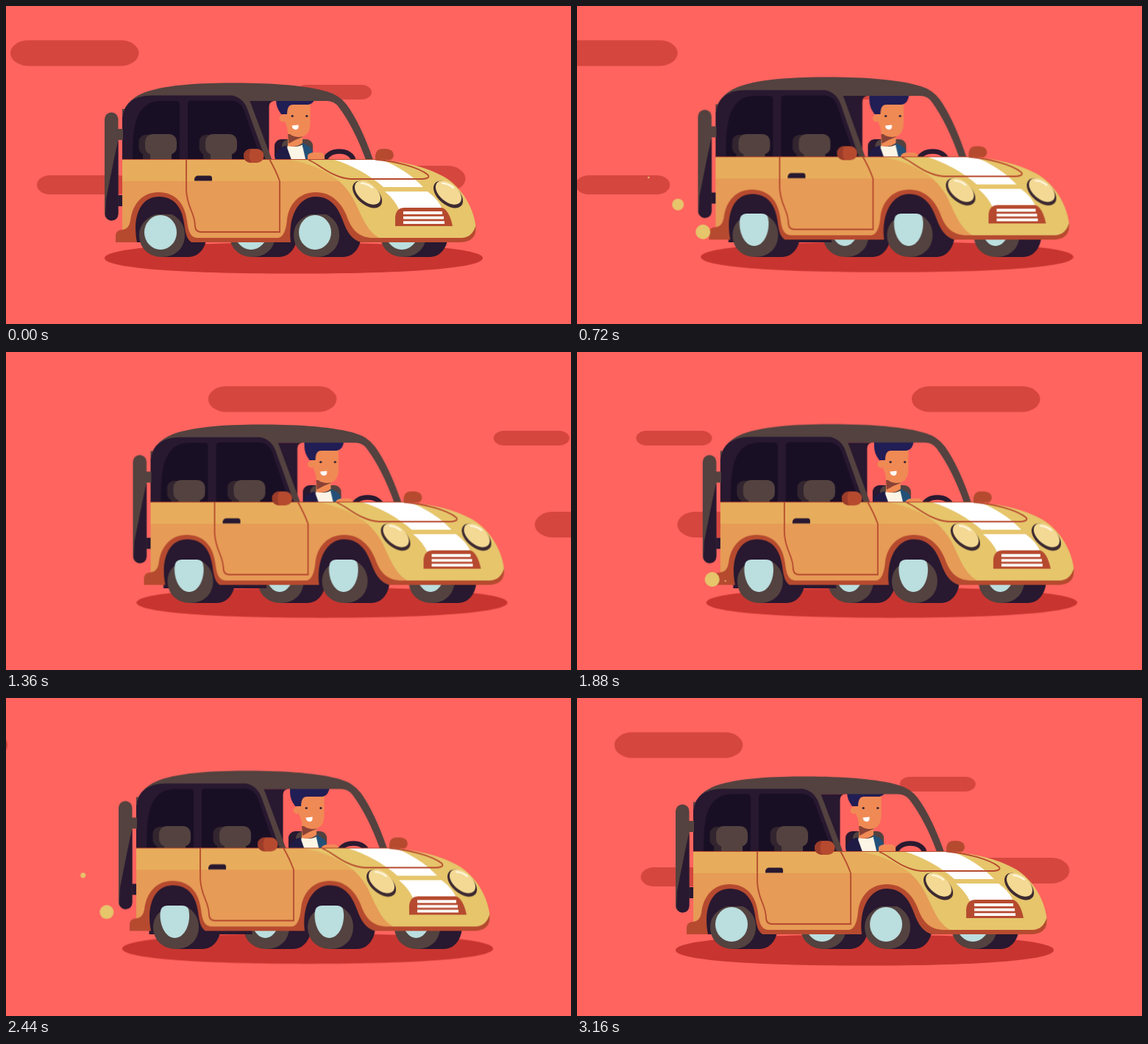
Recreate the animation shown at these times as an HTML page. Size 768 by 432 pixels, loop 3.2 s.

```html
<!DOCTYPE html>
<html lang="en">
<head>
<meta charset="utf-8">
<title>Car ride</title>
<style>
  html, body { margin: 0; width: 100%; height: 100%; overflow: hidden; background: #ff645f; }
  svg { display: block; width: 100vw; height: 100vh; }

  .cloud { fill: #d5463f; }
  .grey { fill: #53423f; }
  .dark { fill: #281830; }
  .glass { fill: #190f25; }
  .rust { fill: #b64a2f; }
  .skin { fill: #f08a55; }
  .sun { fill: #e6c56b; }
  .ice { fill: #bbdedf; }
  .white { fill: #fff; }
  .line { fill: none; stroke: #b64a2f; stroke-width: 1.8; }
  .thin { stroke-width: 1; }

  /* Stepped parts run at 25 frames per second. */
  .drift { animation: drift 1600ms steps(40) -1044ms infinite; }
  .drift.late { animation-delay: -364ms; }
  .sway { animation: sway 3200ms infinite; }
  .bob, .cabin, .shadow, .round, .flat { animation: bob 400ms step-end -4ms infinite; }
  .cabin { animation-name: cabin; transform-origin: 0 208px; }
  .shadow { animation-name: press; transform-origin: 391px 342px; }
  .round { animation-name: landed; }
  .flat { animation-name: lifted; }
  .puff { animation: puff 1600ms linear 60ms infinite both; }
  .puff.b { animation-delay: 260ms; }
  .puff.c { animation-delay: 460ms; }

  @keyframes drift {
    from { transform: translateX(1164.8px); }
    to { transform: translateX(-627.2px); }
  }
  @keyframes sway {
    0% { transform: translateX(0); animation-timing-function: cubic-bezier(.2, .28, .3, 1); }
    50% { transform: translateX(39px); animation-timing-function: cubic-bezier(.45, 0, .6, 1); }
    100% { transform: translateX(0); }
  }
  @keyframes bob {
    0%, 90%, 100% { transform: translateY(0); }
    10% { transform: translateY(-4.6px); }
    80% { transform: translateY(-3.6px); }
  }
  @keyframes cabin {
    0%, 100% { transform: translateY(0) scaleY(1); }
    10% { transform: translateY(-4.6px) scaleY(1.01); }
    40% { transform: translateY(-4.6px) scaleY(1.014); }
    70% { transform: translateY(-4.6px) scaleY(1.018); }
    80% { transform: translateY(-3.6px) scaleY(1.042); }
    90% { transform: translateY(0) scaleY(.98); }
  }
  @keyframes press {
    0%, 90%, 100% { transform: translateY(0) scale(1); }
    10% { transform: translateY(-2px) scale(.981); }
    80% { transform: translateY(-1.6px) scale(.985); }
  }
  @keyframes landed {
    0%, 90%, 100% { opacity: 1; }
    10% { opacity: 0; }
  }
  @keyframes lifted {
    0%, 90%, 100% { opacity: 0; }
    10% { opacity: 1; }
  }
  @keyframes puff {
    0% { transform: translate(166px, 311px) scale(0); }
    1.25% { transform: translate(165px, 311px) scale(.1); }
    13.75% { transform: translate(147px, 309px) scale(1); }
    16.25% { transform: translate(141px, 307px) scale(1); }
    23.75% { transform: translate(118px, 291px) scale(.95); }
    28.75% { transform: translate(107px, 270px) scale(.8); }
    36.25% { transform: translate(86px, 241px) scale(.35); }
    41.25% { transform: translate(67px, 233px) scale(.12); }
    43.75%, 100% { transform: translate(60px, 231px) scale(0); }
  }
</style>
</head>
<body>
<svg viewBox="0 0 768 432" preserveAspectRatio="none">
  <defs>
    <g id="clouds" class="cloud">
      <rect x="6" y="46.5" width="174.500" height="35" rx="25" ry="17.500"/>
      <rect x="394" y="107" width="103" height="20" rx="14" ry="10"/>
      <rect x="42" y="230" width="128" height="26" rx="18" ry="13"/>
      <rect x="450" y="217" width="174.500" height="35" rx="25" ry="17.500"/>
    </g>
    <path id="tread" class="dark" d="M212 341 H248 C263 341 273 327 273 309 C273 292 263 278 248 278 H212Z"/>
    <path id="face" class="grey" d="M204 283 C189 288 181 298 181 311 C181 329 194 341 212 341 C230 341 243 329 243 311 C243 298 236 288 225 283Z"/>
    <ellipse id="disc" class="ice" cx="210" cy="307.500" rx="22" ry="23.500"/>
    <path id="shield" class="ice" d="M190.500 293 Q191 282 200 282 H221 Q230 282 230 293 C231 311 222 326 210.500 326 C199 326 190 311 190.500 293Z"/>
    <g id="headrest">
      <rect x="180.500" y="175" width="32" height="27" rx="9" fill="#33252f"/>
      <rect x="186" y="198" width="24" height="12" fill="#33252f"/>
      <rect class="grey" x="189" y="174" width="43" height="28" rx="10"/>
      <rect class="grey" x="196" y="198" width="29" height="12"/>
    </g>
    <g id="lamp">
      <ellipse cx="491" cy="256" rx="23.500" ry="13.800" transform="rotate(40 491 256)" fill="#3d2a31"/>
      <g transform="rotate(40 491.500 253.500)">
        <ellipse cx="491.500" cy="253.500" rx="20.500" ry="12.200" fill="#f3d994"/>
        <path d="M477 249 Q484 244 492 244.200" fill="none" stroke="#fff6dc" stroke-width="2.500" stroke-linecap="round"/>
      </g>
    </g>
  </defs>

  <rect width="768" height="432" fill="#ff645f"/>
  <use class="drift" href="#clouds"/>
  <use class="drift late" href="#clouds" x="1"/>

  <g class="sway">
    <path class="shadow" fill="#c83530" d="M134 342.500 C134 329.500 230 321.500 391 321.500 S648 329.500 648 342.500 S552 363.500 391 363.500 S134 355.500 134 342.500Z"/>

    <!-- far wheels and chassis -->
    <use href="#tread" x="123"/>
    <use href="#tread" x="328"/>
    <use href="#face" x="123"/>
    <use href="#face" x="328"/>
    <g class="round"><use href="#disc" x="123"/><use href="#disc" x="328"/></g>
    <g class="flat"><use href="#shield" x="123"/><use href="#shield" x="328"/></g>
    <rect class="dark" x="175.500" y="300" width="140" height="21"/>
    <use href="#tread"/>
    <use href="#tread" x="210"/>

    <!-- driver -->
    <rect class="dark" x="365" y="181" width="34" height="32" rx="9"/>
    <rect class="grey" x="375" y="181" width="42" height="32" rx="9"/>
    <path fill="#fbf5e6" d="M378 212 L383 189 Q396 194 405 187 L412 212Z"/>
    <path fill="#1f1b45" d="M366 212 V203 Q367 193 381 189.500 L389 212Z"/>
    <path fill="#235078" d="M402 186 Q416 190 417 200 V212 H408Z"/>
    <path class="skin" d="M383 168 H403 V186 Q394 193 383 190Z"/>
    <path fill="#8a4236" d="M383 174 H403 V178 Q394 181 384 187Z"/>
    <circle class="skin" cx="376.500" cy="152.500" r="5"/>
    <path class="skin" d="M377 128 H413.500 V160 Q413 178 397 178 Q383 177 382 165 L378 155Z"/>
    <path fill="#211d55" d="M367 117 H421 Q421 132 411 134 H390 Q382 134 382 147 H374 Q367 138 367 128Z"/>
    <circle cx="389.200" cy="149.500" r="1.600" fill="#2b2035"/>
    <circle cx="408.800" cy="149.500" r="1.600" fill="#2b2035"/>
    <path class="white" d="M388.500 162.500 L397.500 161.500 Q398.500 167.800 393.800 168 Q389 167.500 388.500 162.500Z"/>
    <ellipse cx="453" cy="210" rx="19" ry="12.500" fill="none" stroke="#2a1a30" stroke-width="6.500"/>
    <path class="skin" d="M410 212 V203 Q412 199 419 199 H428 Q433 200 433 205 V212Z"/>

    <!-- roof, pillars and side windows -->
    <g class="cabin">
      <path class="grey" d="M158 154 Q159 129 188 117.500 C220 106 270 104.500 312 104.500 C360 104.500 410 108 437 116.500 Q453 121 463 134 Q482 160 499 209 H489 Q473 165 452 137 Q446 129 436 129 H320 V140 H158Z"/>
      <path class="dark" d="M330 129 H364 Q357.500 130 357.500 137 V209 H350Z"/>
      <path class="dark" d="M158 209 V151 Q162 122 198 121.500 H308 Q322 122 329 139 L354 209Z"/>
      <path class="grey" d="M306 121.500 H322 Q330 124 333 133 L361.500 209 H353 L328 140 Q322 124 306 121.500Z"/>
      <path class="glass" d="M172 209 C172 165 176 150 187 138 Q195 129.500 210 129 H231 Q236 129 236 134 V209Z"/>
      <path class="glass" d="M247 209 V133 Q247 128.500 252 128.500 H306 Q318 129 323 141 L347 209Z"/>
    </g>
    <use href="#headrest"/>
    <use href="#headrest" x="82"/>

    <g class="bob">
      <!-- spare wheel -->
      <rect class="grey" x="150" y="167" width="9" height="15"/>
      <rect class="dark" x="150" y="257" width="9" height="15"/>
      <rect class="grey" x="134" y="144.500" width="18.500" height="147" rx="9.250"/>
      <path class="dark" d="M152.500 182 L147 207 L136 262 L135 285 Q138 291.500 143.200 291.500 Q152.500 291 152.500 282Z"/>

      <!-- body -->
      <path fill="#e69b56" d="M158 208 H500 C545 211 580 222 600 235 C624 252 636 278 638.500 300 Q640 318 620 320 H158Z"/>
      <path fill="#e7ad5c" d="M158 208 H400 C430 213 450 225 460 238 H158Z"/>
      <path class="sun" d="M380 208 H500 C545 211 580 222 600 235 C624 252 636 278 638.500 300 Q640 317 620 318 H515 C492 312 485 288 472 262 C458 236 428 215 380 208Z"/>
      <path class="white" d="M445 208.500 H510 C532 217 552 230 567 246 H513 C495 230 470 216 445 208.500Z"/>
      <path class="white" d="M515 252 H573 Q588 263 593 276 H534 Q528 263 515 252Z"/>
      <path class="line" d="M411 209 C425 214 442 233 468 235 H566 Q578 234 573 229 C560 219 530 211 502 208.500"/>
      <path class="line thin" d="M158 208.500 H505"/>

      <!-- sill, bumper and arches -->
      <path class="rust" d="M149 321 V311 Q150 304 158 304 Q167 303 169 292 C172 267 187 253 207 253 C230 253 243 268 246 292 C248 308 251 315 262 315 H370 Q380 313 382 290 C385 267 400 253 421 253 C443 253 456 268 463 285 C470 305 480 315 500 315 H620 Q634 314 638.500 298 Q641 321 616 321Z"/>
      <path class="dark" d="M178 321 Q176 312 176 300 C177 274 189 259 208 259 C228 259 239 273 242 295 C244 310 246 317 252 321Z"/>
      <path class="dark" d="M387 321 C383 287 397 259 421 259 C442 259 452 275 458 292 C464 308 470 317 482 321Z"/>

      <!-- door -->
      <path class="line" d="M245 208 V250 C246 275 257 280 257 300 Q258 307 265 307 H372 V238 Q367 224 358 208"/>
      <path class="dark" d="M256 237.500 V235 Q257 230.500 261 230.500 H277 Q280 230.500 280 234 V237.500Z"/>

      <!-- mirrors, lamps, grille -->
      <rect class="rust" x="323" y="194" width="27.500" height="19" rx="9.500"/>
      <path fill="#9c3c2a" d="M333 194 Q323 195 323 203.500 Q323 212 333 213 Q328 203 333 194Z"/>
      <path class="rust" d="M502 208.500 V203 Q503 194 512 194 H517 Q527 195 527 203 Q526 208 522 209Z"/>
      <use href="#lamp"/>
      <use href="#lamp" x="110"/>
      <path class="rust" d="M529 299 V287 Q530 274 542 274 H592 Q602 276 607 299Z"/>
      <path d="M540 281 H593 M540 287.600 H595 M540 294.200 H596" stroke="#fff" stroke-width="3.800"/>
    </g>

    <!-- near wheels -->
    <use href="#face"/>
    <use href="#face" x="210"/>
    <g class="round"><use href="#disc"/><use href="#disc" x="210"/></g>
    <g class="flat"><use href="#shield"/><use href="#shield" x="210"/></g>

    <!-- exhaust -->
    <circle class="sun puff" r="10"/>
    <circle class="sun puff b" r="10"/>
    <circle class="sun puff c" r="10"/>
  </g>
</svg>
</body>
</html>
```
